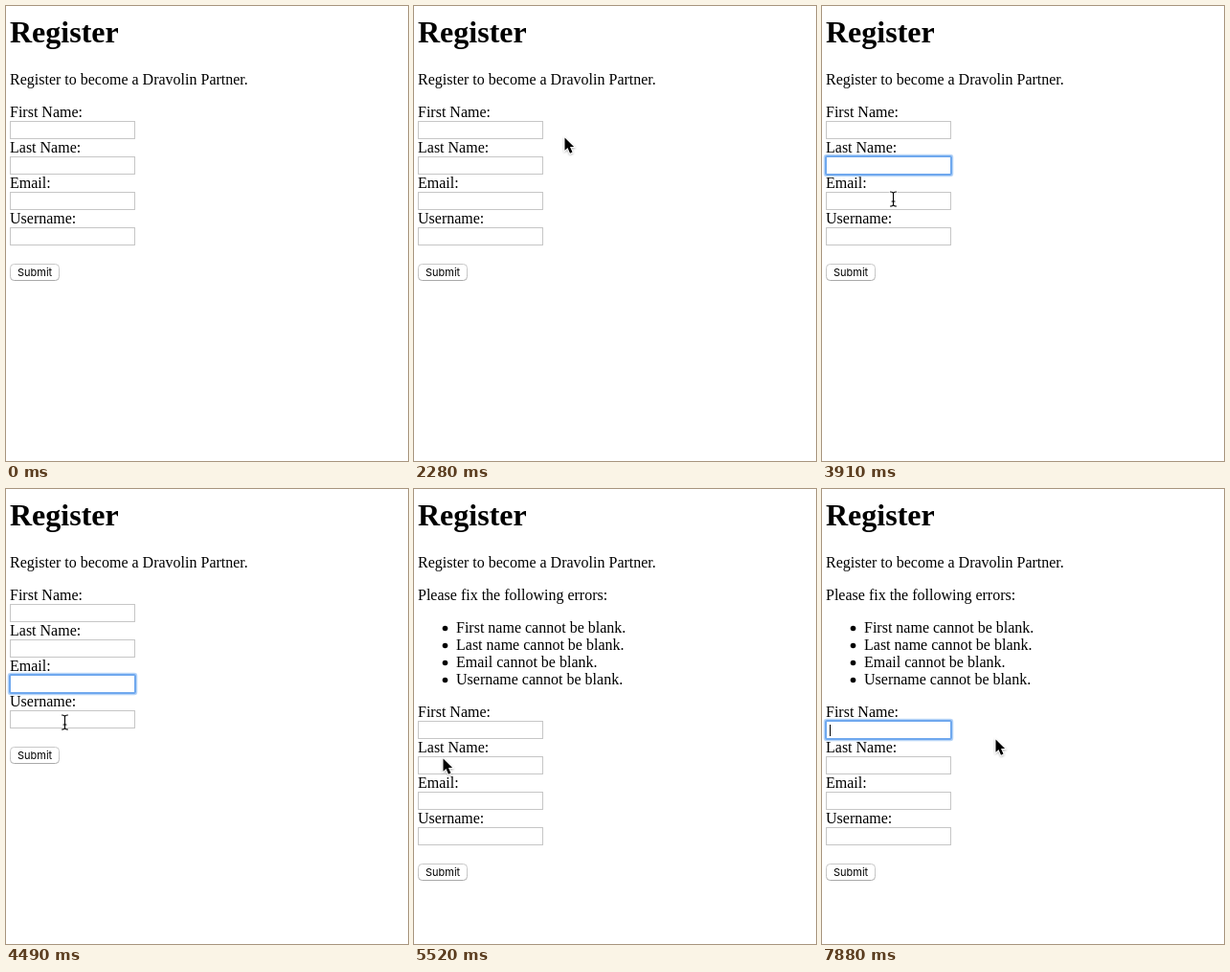
Write an HTML page that moves like this. It is 420x475 px and loops after 8000 ms.

```html
<!DOCTYPE html>
<html lang="en">
<head>
<meta charset="utf-8">
<title>Register</title>
<style>
  html, body { margin: 0; width: 100%; height: 100%; overflow: hidden; background: #fff; }
  svg { display: block; width: 420px; height: 475px; }
  text { font: 16px "Liberation Serif", serif; }
  text.title { font-size: 32px; font-weight: bold; }
  text.button { font: 11px Inter, sans-serif; }
</style>
</head>
<body>
<svg viewBox="0 0 420 475">
  <defs>
    <linearGradient id="edge" x2="0" y2="1">
      <stop offset=".6" stop-color="#c8c8c8"/>
      <stop offset="1" stop-color="#a9a9a9"/>
    </linearGradient>
    <filter id="shade" x="-50%" y="-50%" width="200%" height="200%">
      <feDropShadow dx="0" dy="1" stdDeviation=".8" flood-opacity=".35"/>
    </filter>
  </defs>
  <text class="title" x="4" y="38">Register</text>
  <text x="4" y="82">Register to become a Dravolin Partner.</text>
  <g id="errors"><text x="4" y="116">Please fix the following errors:</text></g>
  <g id="form">
    <g id="fields"></g>
    <rect x="4.5" y="269.5" width="51" height="17" rx="4" fill="#fff" stroke="url(#edge)"/>
    <text class="button" x="12" y="282">Submit</text>
    <g id="focus" fill="none">
      <rect x="2.5" y="118.5" width="134" height="22" rx="2.5" stroke="#b9d6f8" stroke-width="1.6"/>
      <rect x="4" y="120" width="131" height="19" rx="1" stroke="#6fa8ee" stroke-width="2"/>
      <path id="caret" d="M8.5 124v12" stroke="#000"/>
    </g>
  </g>
  <path id="arrow" d="M0 0V13.2L3 10.5L5.5 16.2L8 15.1L5.5 9.6H9.6Z"
        stroke="#fff" stroke-width="1.6" paint-order="stroke" filter="url(#shade)"/>
  <g id="beam" fill="none" stroke-linecap="round">
    <path id="bar" d="M-3 -7.5Q-.3 -7.5 0 -5.8Q.3 -7.5 3 -7.5M0 -5.8V5.8M-3 7.5Q-.3 7.5 0 5.8Q.3 7.5 3 7.5M-1.5 2.5H1.5"
          stroke="#fff" stroke-width="2.4"/>
    <use href="#bar"/>
  </g>
</svg>
<script>
const LOOP = 8000, ERRORS_AT = 5520, ERRORS_HEIGHT = 122, ROW = 37, CARET_ON = 430;
const $ = id => document.getElementById(id);
const labels = ['First Name', 'Last Name', 'Email', 'Username'];
const messages = ['First name', 'Last name', 'Email', 'Username'];

$('fields').innerHTML = labels.map((label, i) => `
  <text x="4" y="${116 + i * ROW}">${label}:</text>
  <rect x="4.5" y="${120.5 + i * ROW}" width="130" height="18" fill="#fff" stroke="#c6c6c6"/>`).join('');
$('errors').innerHTML += messages.map((name, i) => `
  <circle cx="32.5" cy="${145.5 + i * 18}" r="2.8"/>
  <text x="44" y="${150 + i * 18}">${name} cannot be blank.</text>`).join('');

// Pointer moves: first step, last step, step count, target x, y, shape on arrival
const moves = [
  [500, 500, 1, 354, 103, 'arrow'],
  [650, 950, 3, 79, 123, 'arrow'],
  [1550, 1840, 3, 180, 138, 'arrow'],
  [2280, 2580, 3, 91, 135, 'beam'],
  [2880, 3320, 4, 86, 168, 'beam'],
  [3468, 3910, 4, 74, 201, 'beam'],
  [4050, 4490, 4, 61, 243, 'beam'],
  [4640, 5080, 4, 30, 282, 'arrow'],
  [5230, 5230, 1, 30, 281, 'arrow'],
  [5667, 6550, 7, 157, 215, 'arrow'],
  [6700, 7140, 4, 85, 250, 'beam'],
  [7590, 7880, 3, 181, 261, 'arrow']
];

// Focus changes: time, field row (-1 for none)
const focuses = [[0, -1], [2880, 0], [3468, 1], [4050, 2], [4640, 3], [ERRORS_AT, -1], [7590, 0]];

const ease = k => k * k * (3 - 2 * k);
const show = (id, on) => $(id).setAttribute('visibility', on ? 'inherit' : 'hidden');
const place = (id, x, y) => $(id).setAttribute('transform', `translate(${x} ${y})`);

function pointerAt(t) {
  const at = moves.findLastIndex(m => t >= m[0]);
  if (at < 0) return null;
  const [start, end, count, x, y, shape] = moves[at];
  const [, , , fromX, fromY, fromShape] = moves[Math.max(0, at - 1)];
  const gap = (end - start) / (count - 1 || 1) || 1;
  const step = Math.min(count, Math.floor((t - start) / gap + 0.01) + 1);
  const k = ease(step / count);
  return {
    x: Math.round(fromX + (x - fromX) * k),
    y: Math.round(fromY + (y - fromY) * k),
    shape: step === count ? shape : fromShape
  };
}

function draw(t) {
  const failed = t >= ERRORS_AT;
  show('errors', failed);
  place('form', 0, failed ? ERRORS_HEIGHT : 0);

  const [since, row] = focuses.findLast(f => t >= f[0]);
  show('focus', row >= 0);
  place('focus', 0, Math.max(0, row) * ROW);
  show('caret', (t - since) % 1000 < CARET_ON);

  const pointer = pointerAt(t);
  for (const id of ['arrow', 'beam']) {
    const on = pointer && pointer.shape === id;
    show(id, on);
    if (on) place(id, pointer.x + 0.5, pointer.y + 0.5);
  }
}

$('beam').lastElementChild.remove();
const stem = $('bar').cloneNode();
stem.removeAttribute('id');
stem.setAttribute('stroke', '#000');
stem.setAttribute('stroke-width', 1.1);
$('beam').append(stem);

const begin = performance.now();
function tick() {
  draw((performance.now() - begin) % LOOP);
  requestAnimationFrame(tick);
}
tick();
</script>
</body>
</html>
```
